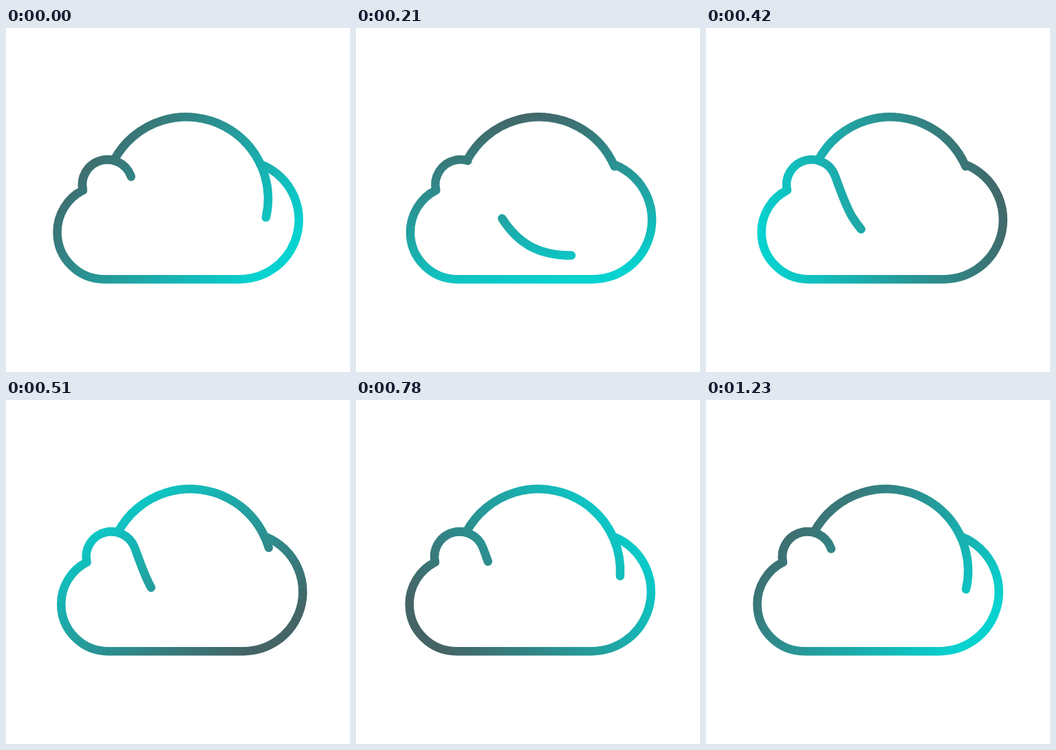
Animation of 500x500 px, one loop 1290 ms. Source, as an HTML page with a canvas:

```html
<!DOCTYPE html>
<html lang="en">
<head>
<meta charset="utf-8">
<title>Cloud</title>
<style>
  html, body { margin: 0; width: 100%; height: 100%; overflow: hidden; background: #fff; }
  canvas { display: block; width: 500px; height: 500px; }
</style>
</head>
<body>
<canvas id="stage" width="500" height="500"></canvas>
<script>
const ctx = document.getElementById('stage').getContext('2d');

const LOOP = 1290, STEP = 30, LAST_STEP = 1230;
const DARK = '#446466', BRIGHT = '#06d2d0';
const BOX = { x: 250, y: 247.4, w: 351, h: 236 };
const DOME = { x: 262, y: 248.3, r: 119 };
const BUMP = { x: 147.3, y: 227.7, r: 36.4 };
const LEFT = { x: 143, y: 296.7, r: 68.5 };
const RIGHT = { x: 339.3, y: 278.8, r: 86.4 };

// The wisp slides along its path; one loop moves it by one full spacing.
const WISP = 120, SPACING = 401;
const LEAD_IN = 1.1, DOME_EXIT = 0.228;
const BUMP_START = Math.PI - 0.23, BUMP_EXIT = -0.36;

const angleTo = (c, x, y) => Math.atan2(y - c.y, x - c.x);
const arc = (path, c, from, to, ccw) => path.arc(c.x, c.y, c.r, from, to, ccw);

function cubicBezier(x1, y1, x2, y2) {
  const curve = (a, b, u) =>
    3 * (1 - u) ** 2 * u * a + 3 * (1 - u) * u * u * b + u ** 3;
  return x => {
    let lo = 0, hi = 1;
    for (let i = 0; i < 24; i++) {
      const mid = (lo + hi) / 2;
      if (curve(x1, x2, mid) < x) lo = mid; else hi = mid;
    }
    return curve(y1, y2, lo);
  };
}

const flowEase = cubicBezier(0.16, 0.66, 0.28, 1);
const turnEase = cubicBezier(0.4, 0.15, 0.35, 1);
const sineEase = x => (1 - Math.cos(Math.PI * x)) / 2;

function makeOutline() {
  const path = new Path2D();
  arc(path, BUMP, BUMP_START, angleTo(BUMP, 158, 192.5));
  arc(path, DOME, angleTo(DOME, 158, 192.5), angleTo(DOME, 371.5, 201));
  arc(path, RIGHT, angleTo(RIGHT, 371.5, 199), Math.PI / 2);
  arc(path, LEFT, Math.PI / 2, angleTo(LEFT, 111.5, 236));
  return path;
}

function makeFlow() {
  const path = new Path2D();
  arc(path, DOME, DOME_EXIT - LEAD_IN, DOME_EXIT);
  path.bezierCurveTo(369, 303, 345, 330.6, 309, 330.6);
  path.bezierCurveTo(258, 330.6, 230, 311, 208, 277);
  path.bezierCurveTo(198, 262, 190, 238, 181.4, 214.9);
  arc(path, BUMP, BUMP_EXIT, BUMP_START, true);
  return path;
}

const outline = makeOutline(), flow = makeFlow();

function drift(time) {
  const peak = 330;
  return 6.3 * (time < peak
    ? sineEase(time / peak)
    : 1 - sineEase((time - peak) / (LAST_STEP - peak)));
}

// The gradient turns in the box's own proportions, so its bands are skewed.
function turningGradient(progress) {
  const angle = (210 + 360 * progress) * Math.PI / 180;
  const gx = Math.cos(angle) / BOX.w, gy = Math.sin(angle) / BOX.h;
  const reach = 0.53 / (gx * gx + gy * gy);
  const dx = gx * reach, dy = gy * reach;
  const gradient = ctx.createLinearGradient(BOX.x + dx, BOX.y + dy, BOX.x - dx, BOX.y - dy);
  gradient.addColorStop(0, DARK);
  gradient.addColorStop(1, BRIGHT);
  return gradient;
}

function draw(time) {
  const progress = time / LOOP;
  ctx.fillStyle = '#fff';
  ctx.fillRect(0, 0, 500, 500);

  ctx.save();
  ctx.translate(drift(time), 0);
  ctx.strokeStyle = turningGradient(turnEase(progress));
  ctx.lineWidth = 12.5;
  ctx.lineCap = ctx.lineJoin = 'round';
  ctx.stroke(outline);

  const lead = LEAD_IN * DOME.r + SPACING * flowEase(progress);
  ctx.setLineDash([WISP, SPACING - WISP]);
  ctx.lineDashOffset = WISP - lead;
  ctx.stroke(flow);
  ctx.restore();
}

const start = performance.now();
function tick() {
  const time = (performance.now() - start) % LOOP;
  draw(Math.min(Math.floor(time / STEP) * STEP, LAST_STEP));
  requestAnimationFrame(tick);
}
tick();
</script>
</body>
</html>
```
